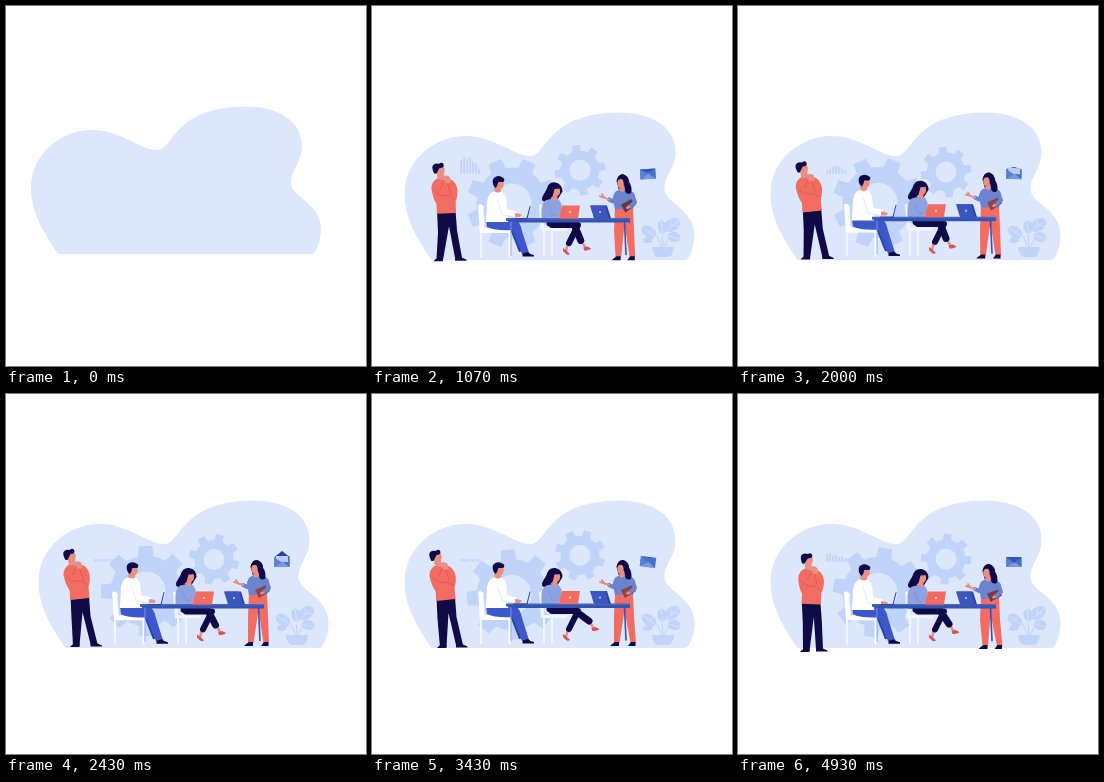
Animation of 360 by 360 pixels, one loop 5000 ms. Source, as an HTML page with a canvas:

```html
<!DOCTYPE html>
<html lang="en">
<head>
<meta charset="utf-8">
<title>Team at work</title>
<style>
html, body { margin: 0; width: 100%; height: 100%; overflow: hidden; background: #fff; }
canvas { display: block; width: 360px; height: 360px; }
</style>
</head>
<body>
<canvas id="stage"></canvas>
<script>
const LOOP = 5000, SCENE_START = 140;
const canvas = document.getElementById('stage');
const ctx = canvas.getContext('2d');
const dpr = window.devicePixelRatio || 1;
canvas.width = canvas.height = 360 * dpr;

const C = {
  blob: '#dde7fb', pale: '#c0d3f8', navy: '#100a47', hair: '#100b48',
  skin: '#e98f84', coral: '#f26c62', fold: '#d4545a', blue: '#3d58cb', deep: '#2b429f',
  table: '#3553b3', lilac: '#8ca3df', shirt: '#6c84d0', white: '#fff', chair: '#f0f5ff'
};

const TIMES = [500, 1570, 2430, 3430, 4210, 4930];
const ease = u => u * u * (3 - 2 * u);
function key(t, ...values) {
  if (t <= TIMES[0]) return values[0];
  for (let i = 1; i < TIMES.length; i++) {
    if (t <= TIMES[i]) {
      const u = ease((t - TIMES[i - 1]) / (TIMES[i] - TIMES[i - 1]));
      return values[i - 1] + (values[i] - values[i - 1]) * u;
    }
  }
  return values[values.length - 1];
}

const fill = (color, d) => { ctx.fillStyle = color; ctx.fill(new Path2D(d)); };
function line(color, width, d) {
  ctx.strokeStyle = color;
  ctx.lineWidth = width;
  ctx.lineCap = ctx.lineJoin = 'round';
  ctx.stroke(new Path2D(d));
}
function oval(color, x, y, rx, ry, tilt = 0) {
  ctx.fillStyle = color;
  ctx.beginPath();
  ctx.ellipse(x, y, rx, ry, tilt, 0, Math.PI * 2);
  ctx.fill();
}
function moved(dx, dy, draw) {
  ctx.save();
  ctx.translate(dx, dy);
  draw();
  ctx.restore();
}
function turned(x, y, degrees, draw) {
  ctx.save();
  ctx.translate(x, y);
  ctx.rotate(degrees * Math.PI / 180);
  ctx.translate(-x, -y);
  draw();
  ctx.restore();
}

function blob() {
  fill(C.blob, 'M52 248C40 230 25 208 25 182C25 148 55 124 86 124C115 124 134 144 151 144' +
    'C168 144 166 101 240 100.5C272 100.5 296 115 296 140C296 157 285 163 285 177' +
    'C285 191 315 197 315 223C315 232 312 242 308 247Q307 248 304 248Z');
}

function gear(x, y, outer, inner, hole, degrees) {
  const step = Math.PI / 4, start = (degrees - 90) * Math.PI / 180;
  ctx.beginPath();
  for (let i = 0; i < 8; i++) {
    const a = start + i * step;
    for (const [r, off] of [[inner, -.22], [outer, -.15], [outer, .15], [inner, .22]]) {
      ctx.lineTo(x + r * Math.cos(a + off), y + r * Math.sin(a + off));
    }
    ctx.arc(x, y, inner, a + .22, a + step - .22);
  }
  ctx.closePath();
  ctx.moveTo(x + hole, y);
  ctx.arc(x, y, hole, 0, Math.PI * 2, true);
  ctx.fillStyle = C.pale;
  ctx.fill('evenodd');
}

function chart(t) {
  const slope = key(t, 1, 0, 0, 0, 0, .22), bell = key(t, 0, 1, 0, 0, 0, 0);
  ctx.fillStyle = C.pale;
  for (let i = 0; i < 7; i++) {
    const fall = 24 - 3.3 * i + (i % 2 ? 4 : -1);
    const h = 2.6 + slope * Math.max(0, fall) + bell * 11 * Math.exp(-((i - 3) ** 2) / 4);
    ctx.fillRect(88.3 + 3 * i, 167.7 - h, 1.8, h);
  }
}

function plant() {
  line(C.pale, 1, 'M290 243Q288 232 279 224M291 243Q289 230 292 218M292 243Q294 234 302 226');
  for (const [x, y, rx, ry, tilt] of [
    [277, 226, 8, 5.5, .6], [290, 221, 4.5, 6.5, -.2], [300, 219, 9, 6, -.6],
    [302, 231, 6.5, 5, .2], [276, 234, 5, 3, -.2]
  ]) oval(C.pale, x, y, rx, ry, tilt);
  line(C.blob, .8, 'M271 222L284 231M289 215L291 230M295 224L307 214M296 230L308 233M299 221L299 214M301 219L309 221M277 226L282 222');
  fill(C.pale, 'M280 241H302Q301 251 295 251H287Q281 251 280 241Z');
}

function envelope(t) {
  const open = key(t, 0, .35, 1, .45, .5, 0);
  turned(276, 168, key(t, -11, 3, 0, 7, 3, 0), () => {
    const tip = 169 - 12 * open;
    if (open > .5) fill(C.deep, `M268.5 163L276 ${tip}L283.7 163Z`);
    fill('#4a70c9', 'M268.3 163H283.7V173H268.3Z');
    if (open > .5) fill('#b9cdf2', 'M270 162H282V168H270Z');
    fill('#7598e2', 'M268.3 173L276 167.5L283.7 173Z');
    fill('#5a80d5', 'M268.3 163.5L276 168.5L268.3 173Z');
    if (open <= .5) fill('#3058b6', `M268.3 163H283.7L276 ${tip}Z`);
  });
}

function thinker(t) {
  const drop = key(t, 4, 1, 0, 1, 3, 5), sway = key(t, 1, 1, .5, .5, .5, -.2);
  const left = key(t, 68, 67, 70, 71, 69, 68), right = key(t, 86, 88, 88.5, 88, 85, 82);
  const hip = 73 + sway;
  moved(0, drop, () => {
    fill(C.navy, `M${hip - 9} 202L${hip + 9.5} 202L${hip + 11} 222L${right + 3} 250H${right - 4}` +
      `L${hip + 3} 218L${left + 3.5} 252H${left - 3}L${hip - 8} 224Z`);
    fill(C.navy, `M${left - 2.5} 250H${left + 3.5}V253H${left - 6}Q${left - 5} 251.5 ${left - 2.5} 250Z`);
    fill(C.navy, `M${right - 4} 249H${right + 2}L${right + 7.5} 251.5V252.5H${right - 4}Z`);
    moved(sway, 0, () => turned(73, 204, key(t, 7.5, 0, 0, 0, 1.5, 8), () => {
      fill(C.skin, 'M61 163L68 164L70 173L63 174Z');
      oval(C.skin, 65, 162, 4.2, 5.6, -.15);
      fill(C.hair, 'M59 166Q56 161 57 158Q59 155 63 156Q67 153 68 157Q68 160 64 160Q62 164 61 166Z');
      fill(C.coral, 'M62 171Q57 174 57 181Q59 191 63 196L64 206L83 204L82 192Q84 187 83 180Q81 173 76 171L69 172Z');
      fill(C.skin, 'M68 168Q72 166 75 169L76 174L71 175Z');
      line(C.fold, .7, 'M60 183Q66 189 74 187L82 191M73 175L77 186M69 174L66 181');
    }));
  });
}

function chairs(lift) {
  moved(-1, lift * .4, () => {
    fill(C.white, 'M107 198Q110 196 112.5 199L114 221H140V225H139.5V250H137.5V226H111V250H109V226Z');
    line('#d1ddf6', .6, 'M110 226V249M112.5 203L114 221');
  });
  moved(0, lift * .4, () =>
    fill(C.chair, 'M167 198Q170 196 172 199V221H195V224H181V249H179V224H173V249H171V224H169Z'));
}

function typist(t, lift) {
  const head = key(t, 3, 1, 0, 0, 0, 2);
  moved(0, lift * .4, () => {
    fill(C.deep, 'M118 214H140Q144 216 147 226L151 244L147 245L138 222L118 221Z');
    fill(C.blue, 'M114 212H143Q148 214 150 224L157 246L150 247L140 223Q124 224 115 220Z');
    fill(C.navy, 'M150.5 246.5L156 245Q158 247.5 162 248V249.5H150.5Z');
  });
  moved(-.7, head, () => {
    fill(C.white, 'M121 184Q115 187 115.5 199L114.5 214H137L135 192Q134 185 129 183Z');
    fill(C.skin, 'M123 177H129L130 183Q127 186 123 183Z');
    oval(C.skin, 128.5, 176, 4, 5.4);
    fill(C.hair, 'M122 177Q120 171 124 169Q128 167 132 170Q134 171 132 174H127Q126 179 124 180Z');
    line(C.white, 6, 'M129 190L134 204L143 206');
    line('#cfdcf5', .6, 'M126 192L131 207L143 209');
  });
  fill(C.skin, `M143 ${205 + head}Q148 ${205 + head} 150 ${207 + head}L148 ${209 + head}H143Z`);
}

function sitter(t, lift) {
  moved(.5, key(t, 3.5, 1.5, 0, 0, 0, 1), () => {
    fill(C.hair, 'M174 181Q176 173 183 174Q190 176 190 183L185 191Q178 192 173 193Q168 193 170 188Z');
    fill(C.lilac, 'M174 191Q169 195 169 202V214H190L189 196Q187 190 183 190Z');
    fill(C.skin, 'M179 184H185V191Q181 193 178 190Z');
    oval(C.skin, 184, 182.5, 3.6, 5.2, -.1);
    fill(C.hair, 'M176 181Q178 174 185 175Q189 176.5 188 180L182 180.5L180 188Q173 194 173 190Z');
    line('#7890d0', .7, 'M176 197L180 206L187 208');
    line(C.skin, 2.4, 'M185 208L190 209');
  });
  const lower = lift * .8;
  moved(0, lower, () => {
    line(C.skin, 2.5, 'M196 235L194 243');
    line(C.navy, 6, 'M180 217L206 217L197 235');
    fill(C.fold, 'M191 240L195 243L198 246Q195 248 193 245L191 243Z');
  });
  const toe = key(t, 217, 212, 215, 222.5, 220.5, 216.5);
  const y = key(t, 241, 240, 237, 233, 233, 236);
  line(C.skin, 2.5, `M${toe - 4} ${y - 4}L${toe - 1} ${y + 1}`);
  line(C.navy, 7, `M178 ${215 + lower}L202 ${216 + lower}L${toe - 5.5} ${y - 6}`);
  fill(C.fold, `M${toe - 3} ${y + 1}L${toe + 1} ${y}L${toe + 5} ${y + 2}Q${toe + 3} ${y + 4} ${toe - 2} ${y + 4}Z`);
}

function table(lift) {
  moved(0, lift, () => {
    line('#8ea6e3', .8, 'M139 213V247');
    line(C.table, 1.6, 'M252.5 213L254 246');
    fill(C.table, 'M134 210H258V214H148Q139 214 134 212Z');
    fill('#4465c2', 'M134 209.5H258V211H134Z');
    line(C.deep, 1, 'M142 210H155L158 198');
    fill('#c9474d', 'M187 209H206V210H187Z');
    fill(C.coral, 'M190 197H208L206 210H187Z');
    oval('#ffd0c9', 198, 203.5, 1, 1);
    fill(C.deep, 'M219 197H235L239 210H223Z');
    fill('#3c56c0', 'M218 197H233L237 210H222Z');
    oval('#bccdf3', 228, 203.5, 1, 1);
  });
}

function presenter(t) {
  const head = key(t, 4, 1, 0, 0, 1, 4), feet = key(t, 4, 1, 0, 0, 2, 3);
  const left = key(t, 3, .5, 0, 0, 1, 2.5), right = key(t, .5, 0, 0, 1, 2, 1.5);
  const hip = 200 + head;
  fill(C.coral, `M243 ${hip - 1}H261L262 ${hip + 22}L${263 + right} ${249 + feet}H${257.5 + right}` +
    `L252.5 ${hip + 16}L${247.5 + left} ${249 + feet}H${242 + left}L242 ${hip + 22}Z`);
  fill(C.navy, `M${243 + left} ${248 + feet}H${247 + left}V${252 + feet}H${238 + left}Q${240 + left} ${250 + feet} ${243 + left} ${248 + feet}Z`);
  fill(C.navy, `M${258 + right} ${248 + feet}H${262.5 + right}V${252 + feet}H${255 + right}Z`);
  moved(0, head, () => {
    fill(C.hair, 'M244.5 173Q246 166 251 166Q256.5 167 257 174Q260 177 259.5 185L253 189L247 182Z');
    fill(C.shirt, 'M246 182Q241 184 241 191L243 201H261L263 193Q265 184 256 181Z');
    fill(C.skin, 'M248 177H253V182Q250 185 247 182Z');
    oval(C.skin, 248.7, 174.5, 3.4, 5.2, .1);
    fill(C.hair, 'M244.5 173Q246 166 251 166Q257 168 257.5 176L259.5 185Q253 187 253 181L251 172Q249 169 244.5 173Z');
    line(C.shirt, 4, 'M245 187L241 193L237 191');
    line(C.skin, 2, 'M237 191L231 189L228 188M232 189L230 186');
    const dark = key(t, 1, 0, 0, 0, .8, .3);
    turned(256, 198, key(t, -8, 0, 0, 0, -4, 3), () => {
      fill(`rgb(${142 - 95 * dark}, ${68 - 28 * dark}, ${72 - 10 * dark})`, 'M249 196L260 191L264 197L253 204Z');
    });
    line(C.shirt, 4, 'M260 186L263 194L258 198');
    oval(C.skin, 256, 199, 2, 1.4, -.4);
  });
}

function scene(t) {
  moved(7.5, 6, blob);
  const spin = (t - 500) * .05;
  gear(140, key(t, 198.5, 196, 197, 200.5, 200.5, 198.5), 45.5, 35.5, 19.5, 6 - spin);
  gear(208, key(t, 161.5, 166.5, 165.5, 161.3, 162, 165), 25.5, 19.5, 10.5, 7 + spin);
  chart(t);
  plant();
  envelope(t);
  const lift = key(t, 3.5, 1.8, .5, 0, 0, .6);
  chairs(lift);
  thinker(t);
  sitter(t, lift);
  typist(t, lift);
  presenter(t);
  table(lift);
}

function frame() {
  const t = performance.now() % LOOP;
  ctx.setTransform(dpr, 0, 0, dpr, 0, 0);
  ctx.fillStyle = '#fff';
  ctx.fillRect(0, 0, 360, 360);
  if (t < SCENE_START) blob();
  else scene(t);
  requestAnimationFrame(frame);
}
frame();
</script>
</body>
</html>
```
